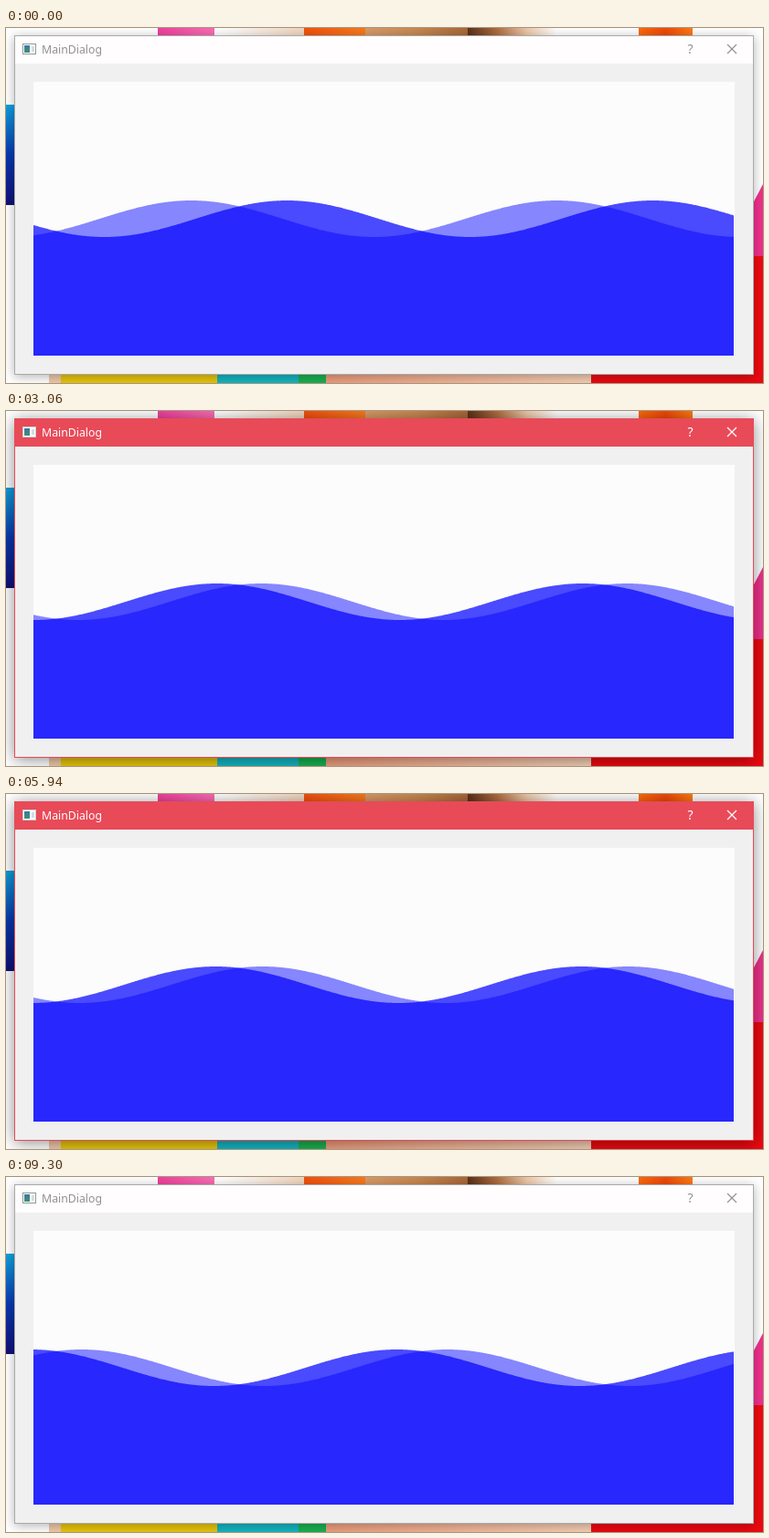
These frames come from a looping animation (828 by 389 pixels, 9330 ms). An HTML page with a canvas:

```html
<!DOCTYPE html>
<html lang="en">
<head>
<meta charset="utf-8">
<title>MainDialog</title>
<style>
  html, body { margin: 0; width: 100%; height: 100%; overflow: hidden; background: #fff; }
  canvas { display: block; }
</style>
</head>
<body>
<canvas id="stage" width="828" height="389"></canvas>
<script>
const ctx = document.getElementById('stage').getContext('2d');
const LOOP = 9330, TICK = 30;
const FOCUS_IN = 2400, RESUME = 2550, FOCUS_OUT = 9270;
const WAVELENGTH = 400, AMPLITUDE = 20, LEVEL = 209;
const MEETING = 255;                          // the crests mirror each other about this x
const SPEED = 9.7 * WAVELENGTH / (LOOP - TICK); // pixels per ms
const RED = '#e84a58';

function rect(x, y, w, h, fill) {
  ctx.fillStyle = fill;
  ctx.fillRect(x, y, w, h);
}

// A box from (x0, y0) to (x1, y1), shaded along its longer side
function band(x0, y0, x1, y1, ...colors) {
  const wide = x1 - x0 > y1 - y0;
  const g = ctx.createLinearGradient(x0, y0, wide ? x1 : x0, wide ? y0 : y1);
  colors.forEach((c, i) => g.addColorStop(i / Math.max(1, colors.length - 1), c));
  rect(x0, y0, x1 - x0, y1 - y0, g);
}

function drawDesktop() {
  const top = (x0, x1, ...colors) => band(x0, 0, x1, 10, ...colors);
  const bottom = (x0, x1, ...colors) => band(x0, 378, x1, 389, ...colors);
  rect(0, 0, 828, 389, '#fff');

  top(166, 228, '#f0409c', '#fb6cb4');
  top(236, 328, '#fff', '#f0d4bc');
  top(326, 393, '#f4500c', '#f87a1c');
  top(393, 505, '#d89a68', '#c88850', '#a86838');
  top(505, 602, '#5a3018', '#b06c40', '#ecc8a8', '#fff');
  top(692, 751, '#ff6a08', '#f04808', '#ff7a10');

  band(0, 84, 10, 194, '#10a0dc', '#0838b0', '#101078');
  ctx.fillStyle = '#f0308c';
  ctx.beginPath();
  ctx.moveTo(828, 171);
  ctx.lineTo(828, 250);
  ctx.lineTo(816, 250);
  ctx.lineTo(816, 194);
  ctx.fill();
  band(816, 250, 828, 389, '#f00810');

  bottom(47, 60, '#f0c8a8');
  bottom(60, 231, '#e6c40c');
  bottom(231, 320, '#14b4c0');
  bottom(320, 350, '#18b050');
  bottom(350, 640, '#ec9c7c', '#f4ceb4');
  bottom(640, 828, '#ec0810');
}

function drawWindow(active) {
  ctx.save();
  ctx.shadowColor = `rgba(0,0,0,${active ? 0.45 : 0.3})`;
  ctx.shadowBlur = active ? 16 : 11;
  ctx.shadowOffsetY = 2;
  rect(9, 8, 809, 372, active ? RED : '#aaa');
  ctx.restore();
  rect(10, 9, 807, 370, '#f0f0f0');
  rect(10, 9, 807, 30, active ? RED : '#fffdfd');

  // window icon
  rect(18, 17, 15, 12, active ? '#c8d0d0' : '#909898');
  rect(19, 18, 13, 10, '#fff');
  band(20, 19, 26, 27, '#3c78a0', '#409078');
  rect(28, 20, 3, 6, '#d8dcdc');

  const ink = active ? '#fff' : '#929292';
  ctx.fillStyle = ink;
  ctx.font = '12.3px "Noto Sans", sans-serif';
  ctx.fillText('MainDialog', 39, 28);
  ctx.font = '14px "Noto Sans", sans-serif';
  ctx.fillText('?', 745.5, 28);
  ctx.strokeStyle = ink;
  ctx.lineWidth = 1.2;
  ctx.beginPath();
  ctx.moveTo(789, 18); ctx.lineTo(799, 28);
  ctx.moveTo(799, 18); ctx.lineTo(789, 28);
  ctx.stroke();
}

function drawWave(crest, alpha) {
  ctx.fillStyle = `rgba(0,0,255,${alpha})`;
  ctx.beginPath();
  ctx.moveTo(30, 359);
  for (let x = 30; x <= 796; x++) {
    ctx.lineTo(x, LEVEL - AMPLITUDE * Math.cos((x - crest) / WAVELENGTH * 2 * Math.PI));
  }
  ctx.lineTo(796, 359);
  ctx.fill();
}

function draw() {
  let t = Math.floor(performance.now() % LOOP / TICK) * TICK;
  if (t > FOCUS_IN && t < RESUME) t = FOCUS_IN;
  drawDesktop();
  drawWindow(t >= FOCUS_IN && t < FOCUS_OUT);
  rect(30, 59, 767, 300, '#fcfcfc');
  // the two waves run in opposite directions
  const offset = 52.5 - SPEED * t;
  drawWave(MEETING - offset, 120 / 255);
  drawWave(MEETING + offset, 180 / 255);
  requestAnimationFrame(draw);
}
draw();
</script>
</body>
</html>
```
